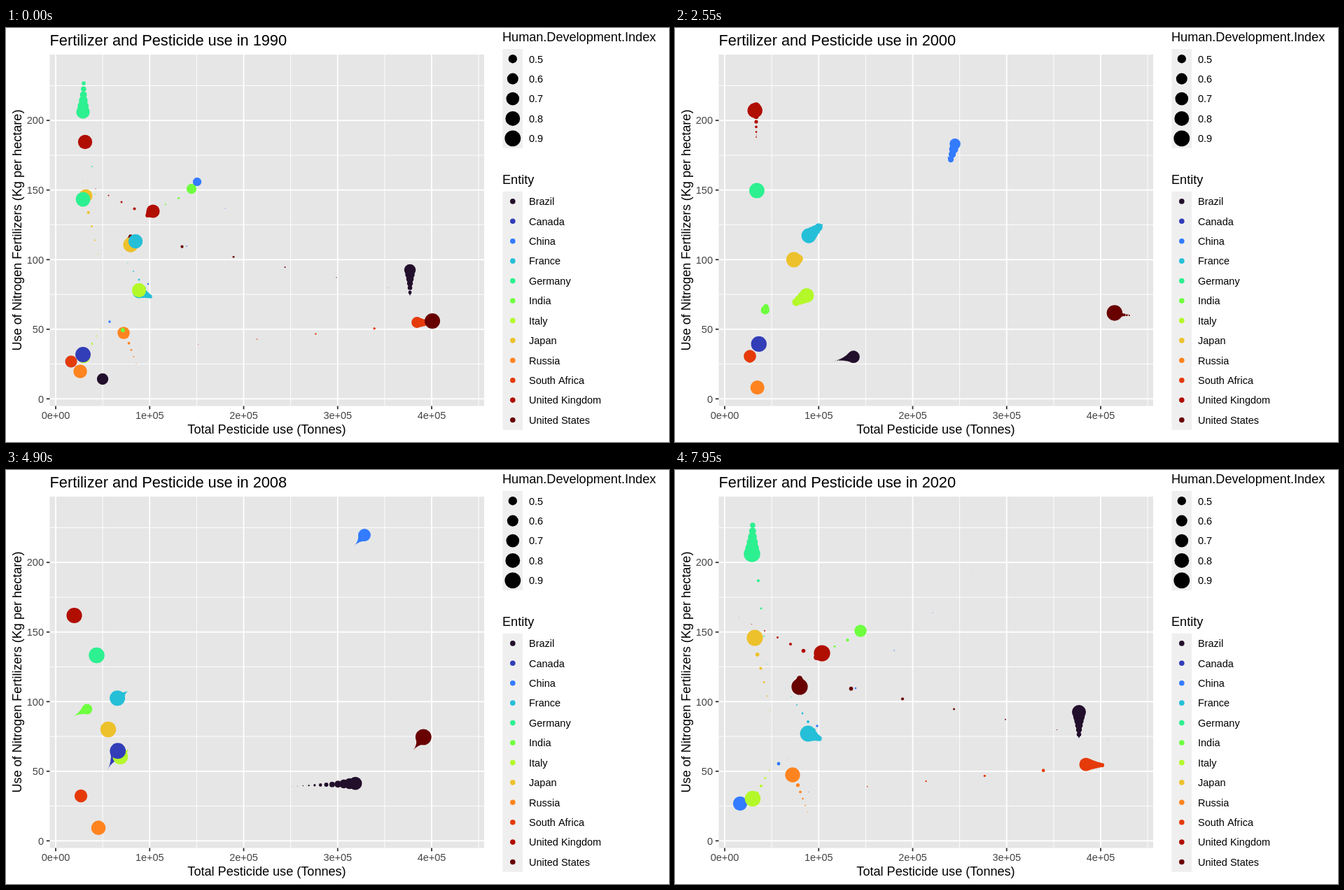
An HTML page with a canvas that plays this animation: 947 px wide and 592 px high, repeating every 8000 ms.

```html
<!DOCTYPE html>
<html lang="en">
<head>
<meta charset="utf-8">
<title>Fertilizer and Pesticide use</title>
<style>
html, body { margin: 0; width: 100%; height: 100%; overflow: hidden; background: #fff; }
canvas { display: block; }
</style>
</head>
<body>
<canvas id="stage" width="947" height="592"></canvas>
<script>
const ctx = document.getElementById('stage').getContext('2d');
const STEPS = 160, STEP_MS = 50, YEARS = 30, WAKE = 16;
const countries = [];

const lerp = (a, b, p) => a + (b - a) * p;
// Area scale from development index to radius.
const radius = hdi => 2.9 + 9 * Math.sqrt((hdi - 0.43) / 0.527);

// The index rises steadily between two values; turns are [step, x, y], joined by straight runs.
function country(name, color, hdi, ...turns) {
  countries.push({ name, color, hdi, turns });
}

country('Brazil', '#220f2b', [.61, .76],
  [0, 138, 502], [21, 184, 483], [32, 207, 481], [53, 260, 469], [74, 360, 443], [85, 391, 453],
  [101, 524, 447], [111, 534, 407], [133, 603, 419], [138, 577, 416], [143, 577, 388],
  [154, 577, 378], [159, 577, 346]);
country('Canada', '#323db8', [.85, .92],
  [0, 110, 467], [32, 127, 451], [53, 119, 452], [74, 120, 461], [79, 131, 425], [85, 143, 432],
  [106, 170, 383], [117, 182, 407], [133, 204, 403], [138, 189, 388], [148, 160, 412]);
country('China', '#337bff', [.5, .77],
  [0, 273, 220], [21, 361, 143], [27, 373, 179], [32, 384, 180], [48, 394, 188], [53, 404, 151],
  [74, 461, 124], [85, 495, 111], [111, 529, 75], [133, 490, 95], [138, 446, 118],
  [148, 423, 150], [154, 93, 474], [159, 93, 477]);
country('France', '#25bfd8', [.78, .9],
  [0, 185, 305], [27, 208, 272], [32, 218, 276], [48, 205, 285], [53, 182, 305], [79, 175, 283],
  [85, 177, 314], [101, 155, 329], [117, 171, 303], [133, 165, 291], [138, 186, 302],
  [143, 144, 319], [148, 158, 312], [154, 206, 384], [159, 190, 377]);
country('Germany', '#2df090', [.8, .94],
  [0, 110, 245], [27, 112, 236], [32, 116, 218], [53, 117, 234], [79, 126, 232], [85, 129, 276],
  [111, 130, 254], [117, 133, 228], [133, 136, 275], [138, 134, 298], [148, 135, 317],
  [154, 111, 79], [159, 110, 120]);
country('India', '#6eff3f', [.43, .65],
  [0, 167, 432], [32, 137, 398], [48, 130, 398], [53, 128, 407], [74, 120, 368], [85, 91, 355],
  [106, 131, 334], [133, 156, 331], [138, 153, 321], [148, 154, 289], [154, 265, 234], [159, 265, 230]);
country('Italy', '#b4f82a', [.77, .885],
  [0, 190, 375], [21, 172, 372], [32, 185, 378], [48, 173, 392], [53, 198, 376], [74, 172, 370],
  [79, 179, 364], [85, 178, 397], [101, 160, 413], [111, 148, 401], [138, 141, 401],
  [148, 147, 407], [154, 111, 474], [159, 111, 470]);
country('Japan', '#edc12c', [.82, .915],
  [0, 178, 310], [32, 178, 336], [48, 177, 330], [53, 165, 332], [79, 153, 326], [85, 150, 376],
  [111, 142, 366], [148, 141, 363], [154, 113, 244], [159, 114, 240]);
country('Russia', '#ff8420', [.735, .82],
  [0, 106, 491], [16, 107, 516], [111, 136, 511], [140, 173, 504], [148, 193, 499],
  [154, 172, 441], [159, 168, 436]);
country('South Africa', '#e53a0a', [.63, .72],
  [0, 93, 477], [32, 103, 473], [48, 107, 474], [53, 107, 466], [127, 107, 466], [133, 107, 455],
  [138, 107, 469], [148, 107, 468], [154, 610, 422], [159, 587, 421]);
country('United Kingdom', '#b10e02', [.775, .925],
  [0, 113, 163], [21, 119, 60], [27, 119, 100], [32, 119, 125], [42, 116, 156], [48, 116, 112],
  [53, 113, 122], [74, 103, 200], [85, 100, 201], [111, 95, 215], [117, 95, 194],
  [138, 98, 191], [148, 91, 211], [154, 202, 268], [159, 210, 262]);
country('United States', '#690000', [.86, .925],
  [0, 609, 419], [27, 655, 407], [32, 642, 405], [42, 649, 411], [48, 627, 409], [69, 633, 398],
  [74, 598, 386], [79, 608, 392], [85, 580, 403], [101, 600, 377], [111, 619, 378],
  [148, 619, 386], [154, 178, 298], [159, 178, 310]);

function pose({ color, hdi, turns }, step) {
  const n = turns.findIndex(([s]) => s >= step);
  if (n < 0) return null;
  const [s1, x1, y1] = turns[n], [s0, x0, y0] = turns[n && n - 1];
  const p = s1 > s0 ? (step - s0) / (s1 - s0) : 0;
  const r = radius(lerp(...hdi, step / (STEPS - 1)));
  return { color, r, x: lerp(x0, x1, p), y: lerp(y0, y1, p) };
}

function dot(x, y, r, color) {
  ctx.fillStyle = color;
  ctx.beginPath();
  ctx.arc(x, y, r, 0, 2 * Math.PI);
  ctx.fill();
}

function box(x, y, w, h, color) {
  ctx.fillStyle = color;
  ctx.fillRect(x, y, w, h);
}

function text(str, x, y, size, align = 'left', color = '#000') {
  ctx.font = size + 'px "Liberation Sans", Arial, sans-serif';
  ctx.textAlign = align;
  ctx.fillStyle = color;
  ctx.fillText(str, x, y);
}

function drawPanel() {
  const left = 62.5, top = 38, w = 620.5, h = 502.5;
  const gx = i => 71 + 134.25 * i, gy = i => 530.3 - 99.53 * i;
  box(left, top, w, h, '#e6e6e6');
  for (let i = 0; i < 5; i++) {
    box(gx(i + .5) - .45, top, .9, h, '#fff');
    box(left, gy(i + .5) - .45, w, .9, '#fff');
  }
  for (let i = 0; i < 5; i++) {
    box(gx(i) - .9, top, 1.8, h, '#fff');
    box(left, gy(i) - .9, w, 1.8, '#fff');
    box(gx(i) - .9, top + h, 1.8, 4.7, '#333');
    box(left - 4.7, gy(i) - .9, 4.7, 1.8, '#333');
    text(i + 'e+0' + (i ? 5 : 0), gx(i), 558.5, 14.5, 'center', '#444');
    text(50 * i, 54, gy(i) + 5.3, 14.5, 'right', '#444');
  }
  text('Total Pesticide use (Tonnes)', 372.5, 579.5, 18.1, 'center');
  ctx.save();
  ctx.translate(22, 289);
  ctx.rotate(-Math.PI / 2);
  text('Use of Nitrogen Fertilizers (Kg per hectare)', 0, 0, 18.1, 'center');
  ctx.restore();
}

function drawLegend() {
  const row = 28.42, keyX = 709.5, midX = 723.8;
  text('Human.Development.Index', 709, 19, 18.1);
  box(keyX, 30, 28.5, row * 5, '#efefef');
  for (let i = 0; i < 5; i++) {
    const y = 44.2 + row * i, h = (5 + i) / 10;
    dot(midX, y, radius(h), '#000');
    text(h.toFixed(1), 747, y + 5.3, 14.5);
  }
  text('Entity', 709, 222.5, 18.1);
  box(keyX, 233.7, 28.5, row * 12, '#efefef');
  countries.forEach((c, i) => {
    const y = 247.9 + row * i;
    dot(midX, y, 3.8, c.color);
    text(c.name, 747, y + 5.3, 14.5);
  });
}

function draw(step) {
  box(0, 0, 947, 592, '#fff');
  drawPanel();
  drawLegend();
  const year = 1990 + Math.round(YEARS * step / (STEPS - 1));
  text('Fertilizer and Pesticide use in ' + year, 62.5, 25.3, 21.75);
  // Oldest wake first, higher values on top; the wake wraps round the loop.
  for (let age = WAKE - 1; age >= 0; age--) {
    const scale = (1 - age / WAKE) ** 3;
    countries.map(c => pose(c, (step - age + STEPS) % STEPS))
      .filter(Boolean)
      .sort((a, b) => b.y - a.y)
      .forEach(p => dot(p.x, p.y, p.r * scale, p.color));
  }
}

const start = performance.now();
function tick() {
  draw(Math.floor((performance.now() - start) / STEP_MS) % STEPS);
  requestAnimationFrame(tick);
}
tick();
</script>
</body>
</html>
```
